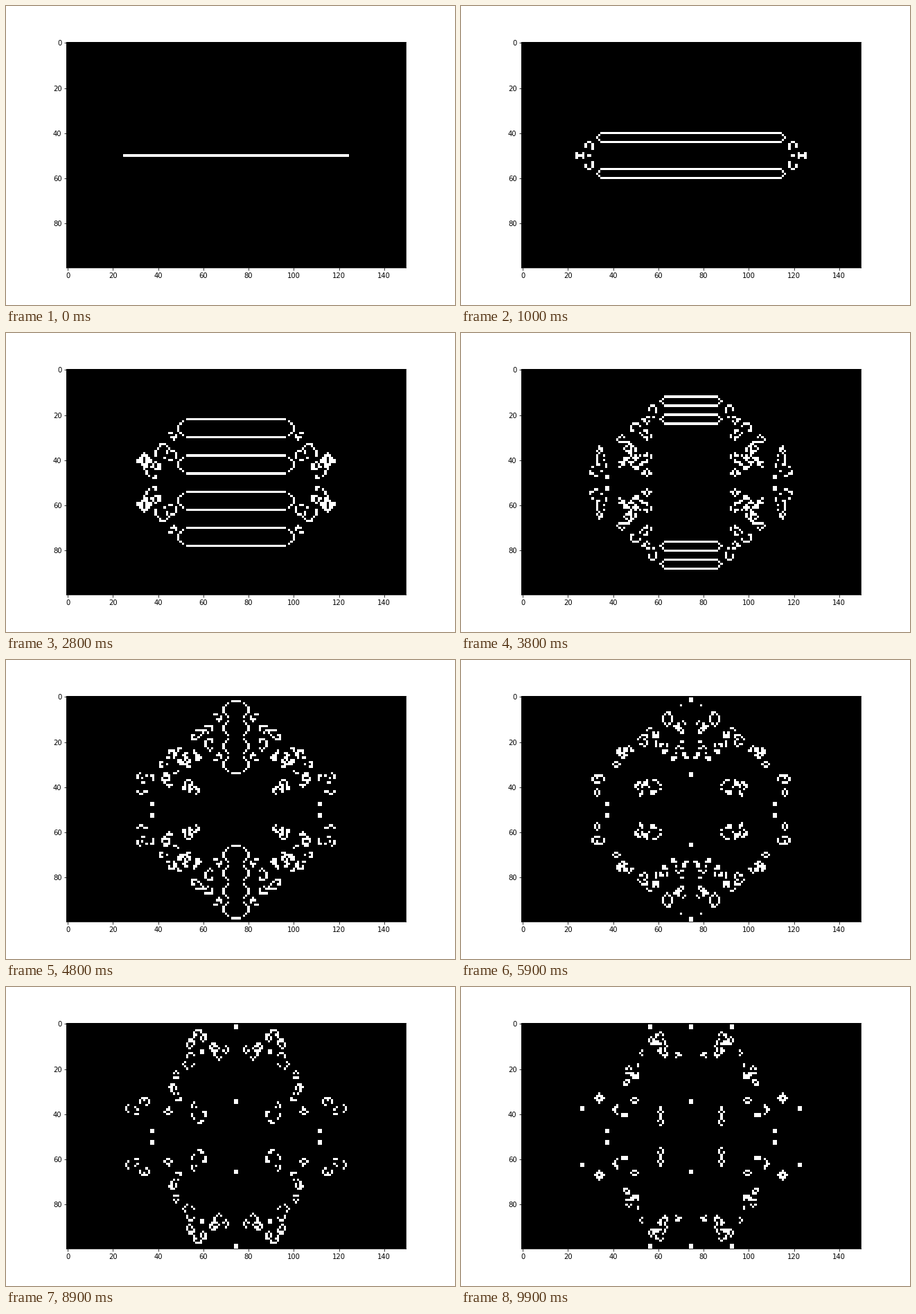
Write a matplotlib script that moves like this. It is 648 by 432 pixels and loops after 10 s.

```python
import numpy as np
import matplotlib.pyplot as plt
from matplotlib.animation import FuncAnimation

ROWS, COLS = 100, 150
STEPS = 100
INTERVAL = 100

plt.rcParams.update({
    "font.family": "DejaVu Sans",
    "font.size": 10,
    "figure.subplot.bottom": 0.125,
})


def evolve(grid):
    """One generation of Conway's Game of Life on a torus."""
    count = sum(
        np.roll(grid, (dy, dx), axis=(0, 1))
        for dy in (-1, 0, 1)
        for dx in (-1, 0, 1)
        if dy or dx
    )
    return ((count == 3) | ((grid == 1) & (count == 2))).astype(int)


start = np.zeros((ROWS, COLS), dtype=int)
start[50, 25:125] = 1

history = [start]
while len(history) < STEPS:
    history.append(evolve(history[-1]))

fig, ax = plt.subplots(figsize=(9, 6), dpi=72)
image = ax.imshow(start, cmap="gray", vmin=0, vmax=1, interpolation="nearest")


def update(step):
    image.set_data(history[step])
    return (image,)


anim = FuncAnimation(fig, update, frames=STEPS, interval=INTERVAL,
                     repeat=True, repeat_delay=0)
plt.show()
```
